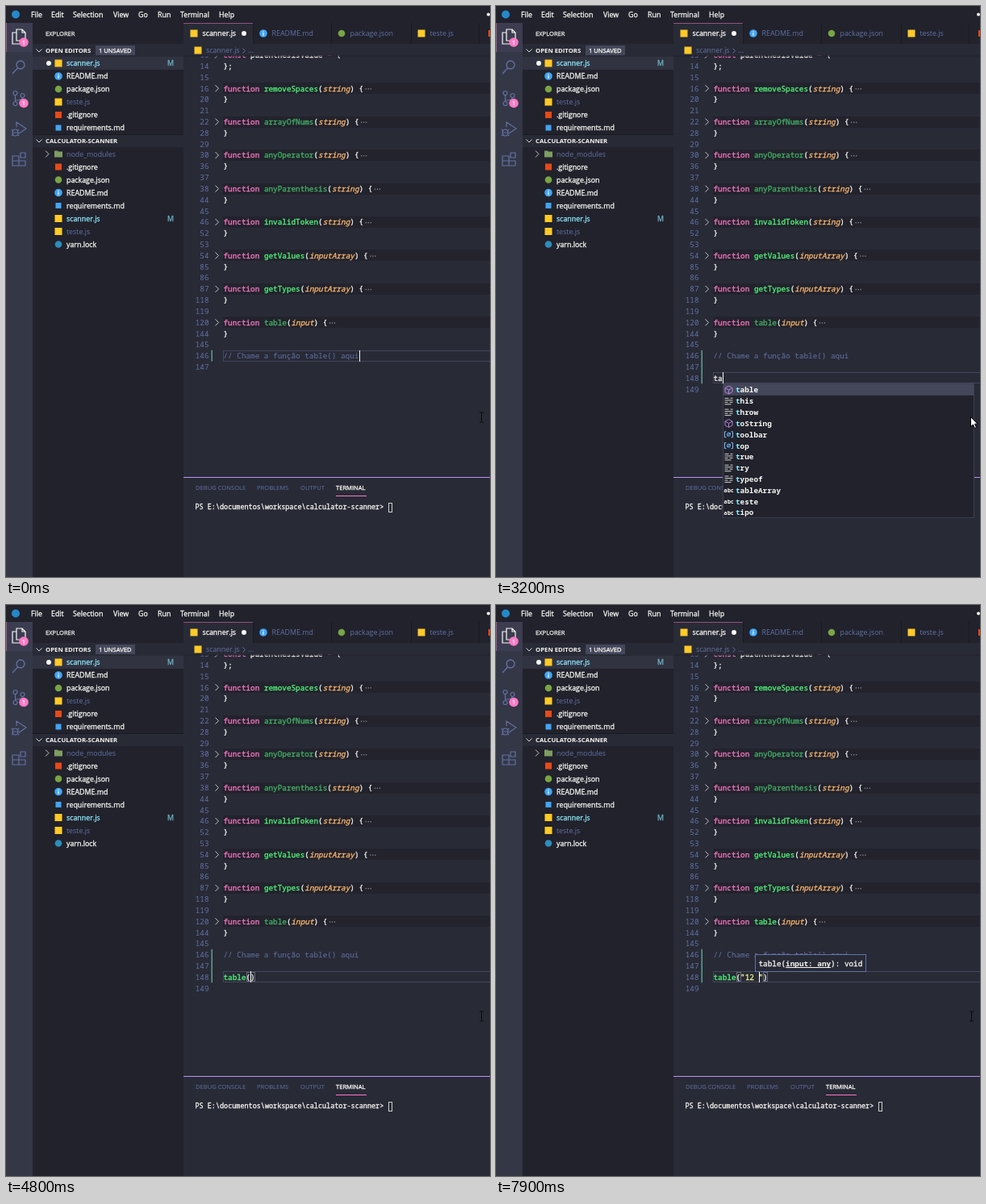
Recreate the animation shown at these times as an HTML page with a canvas. Size 600 by 708 pixels, loop 8 s.

```html
<!DOCTYPE html>
<html lang="pt">
<head>
<meta charset="utf-8">
<title>Code editor</title>
<style>
html, body { margin: 0; width: 100%; height: 100%; overflow: hidden; background: #282a36; }
canvas { display: block; width: 600px; height: 708px; }
</style>
</head>
<body>
<canvas></canvas>
<script>
const W = 600, H = 708, LOOP = 8000;
const canvas = document.querySelector('canvas');
const g = canvas.getContext('2d');
const dpr = window.devicePixelRatio || 1;
canvas.width = W * dpr;
canvas.height = H * dpr;

const MONO = '"Noto Sans Mono", "DejaVu Sans Mono", monospace';
const SANS = '"Open Sans", "Noto Sans", sans-serif';
const CODE = `500 9.33px ${MONO}`, CODE_BOLD = `bold 9.33px ${MONO}`, CODE_ITALIC = `italic 9.33px ${MONO}`;
const UI = `8.85px ${SANS}`, SMALL = `7.6px ${SANS}`, HEAD = `bold 7.75px ${SANS}`;
const BG = '#282a36', SIDE = '#21222c', DARK = '#191a21', SEL = '#44475a', DIM = '#6272a4';
const FG = '#f8f8f2', PINK = '#ff79c6', GREEN = '#50fa7b', FADED = '#43b566', CYAN = '#8be9fd';
const ORANGE = '#ffb86c', PURPLE = '#bd93f9', YELLOW = '#f1fa8c', BLUE = '#42a5f5';
const CHAR = 5.6, LEFT = 269.5, ROW = 13.82, TOP = 74.5;

const rowY = i => TOP + i * ROW;
const colX = n => LEFT + n * CHAR;

function box(x, y, w, h, color) { g.fillStyle = color; g.fillRect(x, y, w, h); }
function frame(x, y, w, h, color) {
  g.strokeStyle = color; g.lineWidth = 1;
  g.strokeRect(x + .5, y + .5, w - 1, h - 1);
}
function disc(x, y, r, color) { g.fillStyle = color; g.beginPath(); g.arc(x, y, r, 0, 7); g.fill(); }
function path(d, x, y, color, width = 1, fill) {
  g.save();
  g.translate(x, y);
  const p = new Path2D(d);
  if (fill) { g.fillStyle = fill; g.fill(p); }
  g.strokeStyle = color; g.lineWidth = width;
  if (width) g.stroke(p);
  g.restore();
}
// Regular weights get a hairline outline for a slightly stronger stem
function text(s, x, y, color = FG, font = UI, align = 'left') {
  const base = y + (font.includes('Mono') ? 3.4 : 3.2);
  g.font = font; g.textAlign = align;
  g.fillStyle = g.strokeStyle = color;
  g.fillText(s, x, base);
  if (color === DIM || font.startsWith('bold')) return;
  g.lineWidth = .3;
  g.strokeText(s, x, base);
}
// Draws [string, colour, font] parts one after another on the character grid
function code(parts, x, y) {
  for (const [s, color, font = CODE] of parts) {
    text(s, x, y, color, font);
    x += s.length * CHAR;
  }
}
const chevron = (x, y, color = '#c5c6cc') => path('M-2-4L2 0L-2 4', x, y, color);
const chevronDown = (x, y) => path('M-3.5-1.5L0 2L3.5-1.5', x, y, '#d8d8d4');

const icons = {
  js: (x, y) => box(x - 4.5, y - 4.5, 9, 9, '#ffca28'),
  json: (x, y) => disc(x, y, 4.3, '#79a544'),
  git: (x, y) => box(x - 4, y - 4, 8, 8, '#e64a19'),
  reqs: (x, y) => box(x - 3.5, y - 3.5, 7, 7, BLUE),
  lock: (x, y) => disc(x, y, 4.3, '#2c8ebb'),
  info(x, y) { disc(x, y, 4.8, BLUE); box(x - .6, y - .8, 1.2, 3.6, '#fff'); box(x - .6, y - 2.8, 1.2, 1.2, '#fff'); },
  folder: (x, y) => path('M-5-4H-1L0-3H5V4H-5Z', x, y, '', 0, '#7f9c62')
};

const files = [
  ['scanner.js', 'js', CYAN], ['README.md', 'info'], ['package.json', 'json'],
  ['teste.js', 'js', DIM], ['.gitignore', 'git'], ['requirements.md', 'reqs']
];
const project = [
  ['node_modules', 'folder', DIM], files[4], files[2], files[1], files[5], files[0], files[3], ['yarn.lock', 'lock']
];

function fileList(list, y) {
  list.forEach(([name, icon, color], i) => {
    const cy = y + i * 16;
    icons[icon](65, cy);
    text(name, 75, cy, color);
    if (color === CYAN) text('M', 204, cy, '#6db5c5', UI, 'center');
  });
}

function titleBar() {
  box(0, 0, W, 21, SIDE);
  disc(12, 10.5, 5, '#2489ca');
  const menu = { File: 31, Edit: 56, Selection: 83, View: 133, Go: 164, Run: 188, Terminal: 216, Help: 264 };
  for (const name in menu) text(name, menu[name], 10.5);
  disc(598, 10.5, 2, FG);
}

function activityBar() {
  box(0, 21, 33, H - 21, '#343746');
  box(0, 21, 33, 36, '#3c3d51');
  box(0, 21, 1, 36, '#9a587f');
  path('M-3-9H4L8-5V5H-3ZM4-9V-5H8M-3-5H-8V9H3V5', 16, 38, FG, 1.2);
  path('M7-3A5 5 0 1 1-3-3A5 5 0 1 1 7-3M-1.5 1L-8 8', 16, 76, DIM, 1.3);
  path('M-2-6A2.5 2.5 0 1 1-7-6A2.5 2.5 0 1 1-2-6M-2 7A2.5 2.5 0 1 1-7 7A2.5 2.5 0 1 1-2 7M7-3A2.5 2.5 0 1 1 2-3A2.5 2.5 0 1 1 7-3M-4.5-3.5V4.5M4.5-.5Q4 3-4.5 3', 16, 114, DIM, 1.2);
  path('M-3-2V-8L9 0L0 6M-1 5A3.5 4 0 1 1-8 5A3.5 4 0 1 1-1 5M-8 5H-1M-9 1L-7 3M0 1L-2 3M-9 9L-7 7M0 9L-2 7', 16, 152, DIM, 1.2);
  path('M-8-4H0V8H-8ZM-8 2H8V8H0M8 2V8M2-8H8V-2H2Z', 16, 190, DIM, 1.2);
  for (const y of [45, 120.5]) {
    disc(22, y, 5.8, PINK);
    text('1', 22, y - .4, FG, `7px ${SANS}`, 'center');
  }
}

function sideBar() {
  box(33, 21, 187, H - 21, SIDE);
  text('EXPLORER', 49, 34, '#e2e2de', SMALL);
  for (const [name, y] of [['OPEN EDITORS', 55], ['CALCULATOR-SCANNER', 167]]) {
    box(33, y - 8, 187, 16, BG);
    chevronDown(41, y);
    text(name, 49, y, FG, HEAD);
  }
  box(33, 159, 187, 1, DARK);
  box(111, 49, 49, 12, SEL);
  text('1 UNSAVED', 115, 55, FG, SMALL);
  box(33, 63, 187, 16, '#313341');
  disc(53, 71, 3, FG);
  fileList(files, 71);
  chevron(51, 183.5);
  fileList(project, 183.5);
}

function tabs() {
  box(220, 21, 380, 26, SIDE);
  box(220, 21, 86, 26, BG);
  box(220, 21, 86, 1, '#94517e');
  [[220, 0], [306, 1], [403, 2], [502, 3], [586, 4]].forEach(([x, i]) => {
    if (i) box(x, 21, 1, 26, DARK);
    icons[files[i][1]](x + (i > 3 ? 16 : 13), 34);
    if (i < 4) text(files[i][0], x + 23.5, 34, i ? DIM : FG);
  });
  disc(295, 34, 3, FG);
}

function breadcrumb() {
  box(220, 47, 380, 14.5, BG);
  icons.js(238, 55);
  text('scanner.js', 248, 55, DIM);
  path('M-1.5-3L1.5 0L-1.5 3', 295, 55.5, DIM);
  text('...', 300, 55, DIM);
  box(220, 61.5, 380, 1, '#20212b');
}

// [first line, closing line, name, argument, used]
const folds = [
  [16, 20, 'removeSpaces', 'string', 1], [22, 28, 'arrayOfNums', 'string', 0],
  [30, 36, 'anyOperator', 'string', 0], [38, 44, 'anyParenthesis', 'string', 0],
  [46, 52, 'invalidToken', 'string', 1], [54, 85, 'getValues', 'inputArray', 1],
  [87, 118, 'getTypes', 'inputArray', 1], [120, 144, 'table', 'input', 0]
];
const lineNumber = (n, y) => text(n, 251.5, y, DIM, CODE, 'right');

function source(t) {
  lineNumber(13, rowY(-1));
  chevron(261, rowY(-1));
  code([['const', PINK], [' parenthesisValue ', FG], ['=', PINK], [' {', FG]], LEFT, rowY(-1));
  lineNumber(14, rowY(0));
  code([['};', FG]], LEFT, rowY(0));
  lineNumber(15, rowY(1));
  folds.forEach(([from, to, name, arg, used], i) => {
    const y = rowY(2 + i * 3), lit = used || (name === 'table' && t >= 5000);
    box(269, Math.round(y - 7), 331, 14, '#22232d');
    lineNumber(from, y);
    chevron(261.5, y);
    code([['function ', PINK], [name, lit ? GREEN : FADED], ['(', FG], [arg, ORANGE, CODE_ITALIC], [') {', FG]], LEFT, y);
    const end = colX(name.length + arg.length + 13);
    for (let k = 0; k < 3; k++) box(end + 2.5 + k * 3, y, 1.3, 1.3, '#8a8c98');
    lineNumber(to, y + ROW);
    code([['}', FG]], LEFT, y + ROW);
    lineNumber(to + 1, y + ROW * 2);
  });
  code([['// Chame a função table() aqui', DIM]], LEFT, rowY(26));
}

function panel() {
  box(220, 584, 380, 124, BG);
  box(220, 584, 380, 1, PURPLE);
  const names = { 'DEBUG CONSOLE': 235, PROBLEMS: 311, OUTPUT: 365, TERMINAL: 409 };
  for (const name in names) text(name, names[name], 597, name === 'TERMINAL' ? FG : DIM, SMALL);
  box(409, 607, 38, 1, PINK);
  text('PS E:\\documentos\\workspace\\calculator-scanner>', 234.5, 621, FG, `500 8.48px ${MONO}`);
  frame(474, 616, 5, 12, '#d0d0cc');
}

// Suggestions: [label, icon, matched start, matched end]
const wide = [
  ['table', 'cube'], ['this', 'word'], ['throw', 'word'], ['toString', 'cube'], ['toolbar', 'vari'], ['top', 'vari'],
  ['true', 'word'], ['try', 'word'], ['typeof', 'word'], ['tableArray', 'abc'], ['teste', 'abc'], ['tipo', 'abc']
].map(([s, icon]) => [s, icon, 0, 1]);
const narrow = n => [['table', 'cube', 0, n], ['tableArray', 'abc', 0, n], ['arrayToTable', 'vari', 7, 7 + n]];

const kinds = {
  cube: (x, y) => path('M0-5L4.5-2.5V2.5L0 5L-4.5 2.5V-2.5ZM-4.5-2.5L0 0L4.5-2.5M0 0V5', x, y, '#b180d7'),
  word: (x, y) => path('M-5-3.5H0M2-3.5H5M-5-1H5M-5 1.5H-1M1 1.5H5M-5 4H3', x, y, '#d4d4d4'),
  vari(x, y) {
    path('M-3-3.5H-5V3.5H-3M3-3.5H5V3.5H3M2 0A2 2 0 1 1-2 0A2 2 0 1 1 2 0M-2 2L2-2', x, y, '#75beff');
  },
  abc: (x, y) => text('abc', x, y - .5, FG, `bold 6.8px ${SANS}`, 'center')
};

function suggestions(x, list, detail) {
  const h = list.length * ROW;
  box(x, 468, 312, h + 1, SIDE);
  box(x, 469, 312, ROW, SEL);
  frame(x, 468, 312, h + 1, '#3c3f52');
  list.forEach(([label, icon, from, to], i) => {
    const y = 476 + i * ROW;
    kinds[icon](x + 7.5, y);
    code([[label.slice(0, from), FG, CODE_BOLD], [label.slice(from, to), CYAN, CODE_BOLD], [label.slice(to), FG, CODE_BOLD]], x + 16, y);
  });
  if (detail) text('function table(input:…', 474, 476, '#e6e6e1', CODE);
}

function hint(x) {
  box(x, 433, 138, 22, BG);
  frame(x, 433, 138, 22, DIM);
  code([['table(', FG], ['input: any', FG, CODE_BOLD], ['): void', FG]], x + 4.5, 444.5);
  box(x + 4.5 + 6 * CHAR, 449, 10 * CHAR, 1, FG);
}

function mouse(arrow) {
  if (arrow) path('M0 0V12L3 9.5L5 14L7 13L5 8.7H8.5Z', 588.5, 509.5, '#000', 1, '#fff');
  else path('M-2.5-6H-.5L0-5.5L.5-6H2.5M0-5.5V5.5M-2.5 6H-.5L0 5.5L.5 6H2.5', 589.5, 510, '#08080c');
}

const keys = [
  [1000, '\n'], [1200, '\n'], [3000, 't'], [3150, 'a'], [3720, 'b'], [3830, 'l'], [3950, 'e'],
  [4650, '('], [5900, '"'], [7100, '1'], [7400, '2'], [7750, ' ']
];
const typedAt = t => keys.filter(k => k[0] <= t).map(k => k[1]).join('');

function activeLine(t) {
  const all = typedAt(t), breaks = all.split('\n').length - 1, typed = all.slice(breaks);
  const row = 26 + breaks, y = rowY(row), last = keys.filter(k => k[0] <= t).pop();
  for (let i = 0; i < breaks + 2; i++) lineNumber(146 + i, rowY(26 + i));
  box(254.5, rowY(26) - 7, 1.5, (breaks + 1) * ROW, '#5a9f90');
  frame(269, Math.round(y - 7), 340, 14, SEL);

  const open = typed.includes('('), quoted = typed.includes('"');
  const string = quoted ? typed.slice(6) + '"' : '';
  if (open) {
    for (const n of [5, 6 + string.length]) frame(Math.round(colX(n)), Math.round(y - 6), 6, 12, '#666974');
  }
  code(open ? [['table', GREEN], ['(', FG], [string, YELLOW], [')', FG]] : [[typed, FG]], LEFT, y);
  const caret = colX(breaks ? typed.length : 30);
  if ((t - (last ? last[0] : 0)) % 1000 < 500) box(Math.round(caret), Math.round(y - 7), 1, 14, FG);
  return { typed, open, caret };
}

function draw(t) {
  g.setTransform(dpr, 0, 0, dpr, 0, 0);
  box(0, 0, W, H, BG);
  source(t);
  const { typed, open, caret } = activeLine(t);
  breadcrumb();
  tabs();
  titleBar();
  sideBar();
  activityBar();
  panel();
  const listing = typed && !open && t >= 3060;
  if (listing) {
    const big = typed.length < 3;
    suggestions(Math.round(caret), big ? wide : narrow(typed.length), !big && t >= 3900);
  }
  if (t >= 5000) hint(Math.round(colX(typedAt(t - 300).length - 2) + .6));
  mouse(listing);
}

function tick(now) {
  draw(now % LOOP);
  requestAnimationFrame(tick);
}
requestAnimationFrame(tick);
</script>
</body>
</html>
```
